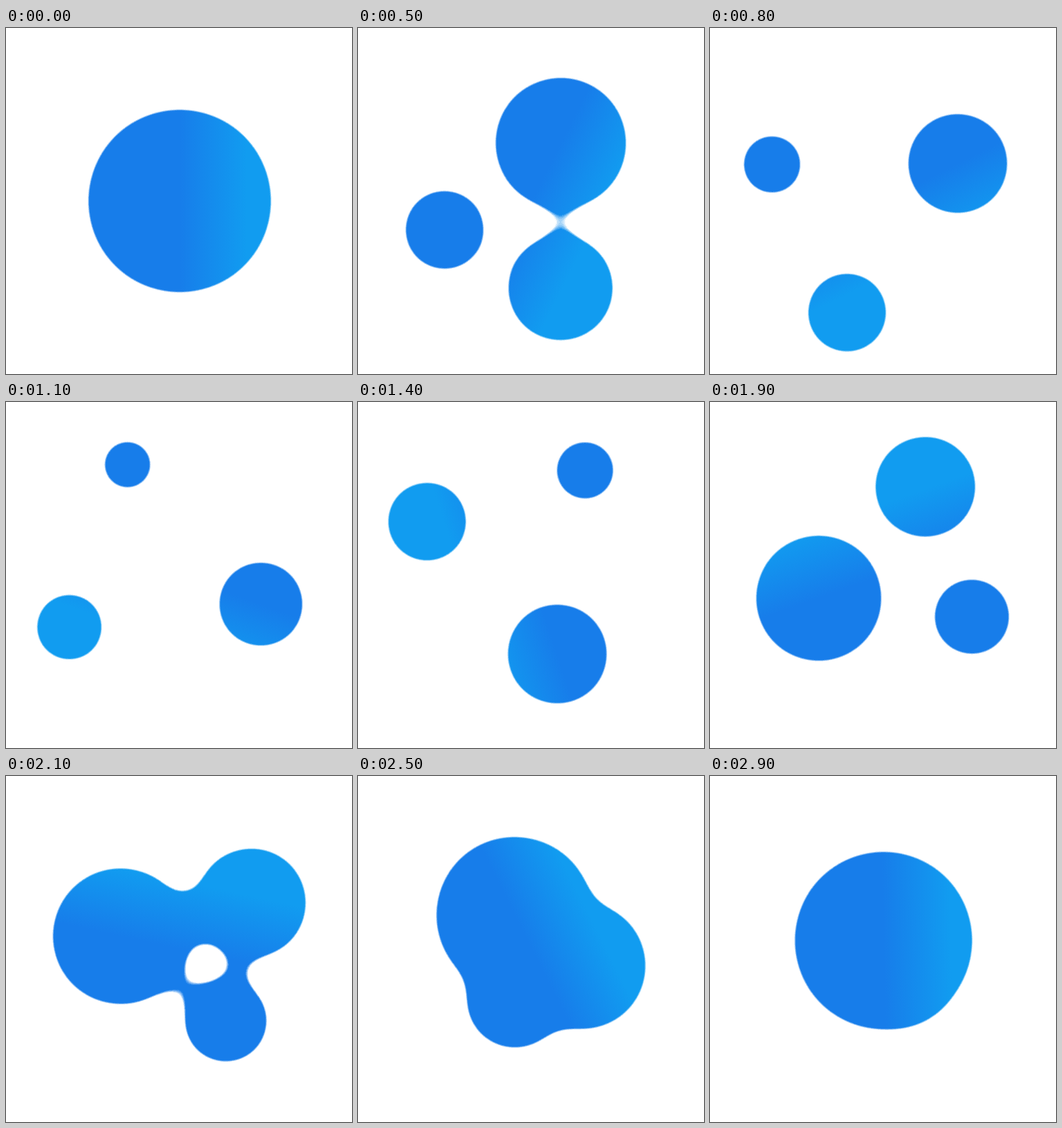
An HTML page that plays this animation: 500 px wide and 500 px high, repeating every 3000 ms.

```html
<!DOCTYPE html>
<html lang="en">
<head>
<meta charset="utf-8">
<title>Gooey blobs</title>
<style>
  html, body { margin: 0; width: 100%; height: 100%; overflow: hidden; background: #fff; }
  #stage { position: relative; width: 500px; height: 500px; overflow: hidden; isolation: isolate; background: #fff; }
  #goo, #tint { position: absolute; left: -149px; top: -150px; width: 800px; height: 800px; }
  /* turns the black shape blue and leaves white as it is */
  #tint {
    background: linear-gradient(90deg, #177dea 400px, #119cf0 497px);
    mix-blend-mode: screen;
  }
</style>
</head>
<body>
<div id="stage">
  <svg id="goo" viewBox="-400 -400 800 800">
    <!-- blur, then a steep alpha threshold, melts the discs together -->
    <filter id="melt" filterUnits="userSpaceOnUse" x="-400" y="-400" width="800" height="800">
      <feGaussianBlur stdDeviation="16"/>
      <feColorMatrix values="1 0 0 0 0  0 1 0 0 0  0 0 1 0 0  0 0 0 30 -25.5"/>
    </filter>
    <g filter="url(#melt)">
      <g id="group"><circle/><circle/><circle/></g>
    </g>
  </svg>
  <div id="tint"></div>
</div>
<script>
const LOOP = 3000, STEP = 100, PEAK = 1000, SPREAD = 125;
const balls = [
  { x: 0, y: -1, radius: 150 },
  { x: 1, y: 1, radius: 125 },
  { x: -1, y: 1, radius: 100 },
];
const group = document.getElementById('group');
const tint = document.getElementById('tint');
const circles = group.querySelectorAll('circle');

function render(time) {
  const t = Math.floor(time % LOOP / STEP) * STEP;
  const p = t / LOOP;
  const angle = 360 * p * p * (3 - 2 * p);

  // 1 when together, 0 when furthest apart
  const u = t < PEAK ? 1 - t / PEAK : (t - PEAK) / (LOOP - PEAK);
  const distance = SPREAD * (1 - u * u);
  const scale = (1 + u) / 2;

  balls.forEach(({ x, y, radius }, i) => {
    circles[i].setAttribute('cx', x * distance);
    circles[i].setAttribute('cy', y * distance);
    circles[i].setAttribute('r', radius * scale);
  });
  group.setAttribute('transform', `rotate(${angle})`);
  tint.style.transform = `rotate(${angle}deg)`;
}

const start = performance.now();
function tick() {
  render(performance.now() - start);
  requestAnimationFrame(tick);
}
tick();
</script>
</body>
</html>
```
